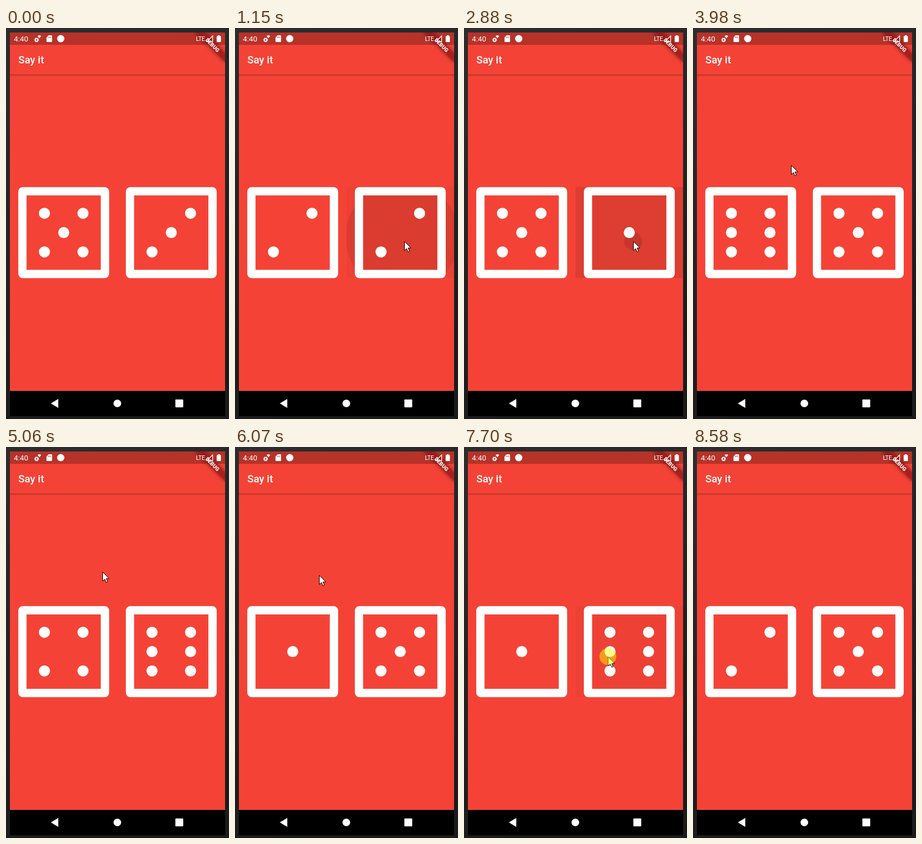
These frames come from a looping animation (398x696 px, 9.42 s). An HTML page:

```html
<!DOCTYPE html>
<html lang="en">
<head>
<meta charset="utf-8">
<title>Dice</title>
<style>
  html, body { margin: 0; width: 100%; height: 100%; overflow: hidden; background: #222; }
  svg { display: block; width: 398px; height: 696px; }
  text { font-family: Roboto, sans-serif; fill: #fff; }
</style>
</head>
<body>
<svg viewBox="0 0 398 696" xmlns="http://www.w3.org/2000/svg">
  <defs>
    <linearGradient id="desk" x2="0.3" y2="1">
      <stop offset="0" stop-color="#2d2d2f"/>
      <stop offset="0.4" stop-color="#262627"/>
      <stop offset="1" stop-color="#1b1b1b"/>
    </linearGradient>
    <linearGradient id="shade" x2="0" y2="1">
      <stop offset="0" stop-color="#000" stop-opacity=".24"/>
      <stop offset="1" stop-color="#000" stop-opacity="0"/>
    </linearGradient>
    <filter id="blur" x="-30%" y="-150%" width="160%" height="400%"><feGaussianBlur stdDeviation="3.6"/></filter>
    <clipPath id="screen"><path d="M7 8h384v683H7z"/></clipPath>
    <clipPath id="button"><rect y="283" width="192" height="162" rx="2"/></clipPath>
  </defs>

  <rect width="398" height="696" fill="url(#desk)"/>
  <g clip-path="url(#screen)">
    <path d="M7 8h384v638H7z" fill="#f44336"/>
    <path d="M7 8h384v22H7z" fill="#b73229"/>
    <path d="M7 82.6h384v4H7z" fill="url(#shade)"/>
    <text x="21.9" y="62.9" font-size="18.67" font-weight="500">Say it</text>
    <g id="dice"></g>

    <g transform="translate(391 8) rotate(45)">
      <rect x="-37.3" y="26.1" width="74.6" height="11.2" opacity=".5" filter="url(#blur)"/>
      <rect x="-37.3" y="26.1" width="74.6" height="11.2" fill="#b71c1c" fill-opacity=".63"/>
      <text y="35" font-size="9.52" font-weight="900" text-anchor="middle">DEBUG</text>
    </g>

    <text x="14" y="24" font-size="13.3">4:40</text>
    <g fill="#fff">
      <circle cx="54.6" cy="21.2" r="2.3" fill="none" stroke="#fff" stroke-width="1.7"/>
      <circle cx="54.6" cy="21.2" r="3.5" fill="none" stroke="#fff" stroke-width="1.3" stroke-dasharray="1.5 1.25"/>
      <path d="M56.4 14.4q3.2-2.6 6.4 0l-3.2 3.8z"/>
      <path d="M76 13h5.2q1 0 1 1v10q0 1-1 1h-7.9q-1 0-1-1v-7z"/>
      <path d="M75.6 15.4v2.4M77.6 15.4v2.4M79.6 15.4v2.4" stroke="#b73229" stroke-width=".9"/>
      <circle cx="97.7" cy="19" r="6.5"/>
      <text x="339" y="23" font-size="11" letter-spacing="-.5">LTE</text>
      <path d="M368.8 14v10.4h-10.4z" fill="none" stroke="#fff" stroke-width="1.3"/>
      <path d="M378 13h3.6v1.2h1q.9 0 .9.9v9q0 .9-.9.9h-5.7q-.9 0-.9-.9v-9q0-.9.9-.9h1.1z"/>
    </g>

    <path d="M7 646h384V691H7z"/>
    <g fill="#fff">
      <path d="M80 668.2l13.3-8v16z"/>
      <circle cx="198.7" cy="668.2" r="6.8"/>
      <rect x="302.3" y="661.2" width="14" height="14" rx="1"/>
    </g>
  </g>

  <g id="pointer">
    <path d="M.5 .5V16.7L4.3 13.2L7 19.1L9.5 17.9L6.9 12.2H12.1Z" fill="#fff" stroke="#000" stroke-linejoin="round"/>
    <circle id="halo" r="15" fill="#ff0" fill-opacity=".47"/>
  </g>
</svg>

<script>
const LOOP = 9420, FRAME = 77, MOVE = 400, PRESS = 150, INK = 170;

// Where the pointer rests, when it arrives and when it taps
const stops = [
  { x: 302, y: 676, at: 310, taps: [] },
  { x: 302, y: 379.5, at: 850, taps: [905, 1610, 2170, 2720] },
  { x: 100, y: 375, at: 3430, taps: [3500] },
  { x: 175, y: 244, at: 3920, taps: [4050] },
  { x: 172, y: 222, at: 4500, taps: [4590, 5130, 5600] },
  { x: 150, y: 228, at: 6000, taps: [6140] },
  { x: 100, y: 365, at: 6740, taps: [6960] },
  { x: 256.7, y: 373, at: 7610, taps: [7690, 8030] },
  { x: 371, y: 688, at: 8575, taps: [] }
];
const taps = stops.flatMap(({ x, y, taps }) => taps.map(at => ({ x, y, at })));

// One pair per roll
const faces = '53 22 46 34 51 65 32 46 24 15 43 16 43 25'.split(' ');

const svg = document.querySelector('svg');
const pointer = document.getElementById('pointer');
const halo = document.getElementById('halo');
const show = (el, on) => { el.style.display = on ? '' : 'none'; };
const mix = (a, b, u) => a + (b - a) * u;

function set(el, attrs) {
  for (const key in attrs) el.setAttribute(key, attrs[key]);
}

function add(parent, tag, attrs) {
  const el = document.createElementNS(svg.namespaceURI, tag);
  set(el, attrs);
  return parent.appendChild(el);
}

// Lowest face on which the pip at column i, row j is seen
function pipShown(i, j, n) {
  if (!i && !j) return n % 2 === 1;
  if (!j) return n === 6;
  return i !== 0 && n > (i === j ? 3 : 1);
}

function makeDie(left) {
  const die = add(document.getElementById('dice'), 'g', { transform: `translate(${left} 0)` });
  const ink = add(die, 'g', { 'clip-path': 'url(#button)' });
  const glow = add(ink, 'rect', { y: 283, width: 192, height: 162 });
  const splash = add(ink, 'circle', {});
  add(die, 'rect', {
    x: 22.2, y: 290.5, width: 147.6, height: 147.6,
    fill: 'none', stroke: '#fff', 'stroke-width': 14.7
  }).remove();
  add(die, 'path', {
    d: 'M22.9 283.2H169.1a8 8 0 0 1 8 8V437.3a8 8 0 0 1-8 8H22.9a8 8 0 0 1-8-8V291.2a8 8 0 0 1 8-8z' +
       'M29.6 298V430.6H162.2V298z',
    fill: '#fff', 'fill-rule': 'evenodd'
  });
  const pips = [];
  for (const i of [-1, 0, 1]) {
    for (const j of [-1, 0, 1]) {
      const dot = add(die, 'circle', { cx: 96 + i * 34.4, cy: 364.2 + j * 34.4, r: 9.9, fill: '#fff' });
      pips.push({ dot, i, j });
    }
  }
  return { left, ink, glow, splash, pips };
}

const dice = [makeDie(7), makeDie(199)];

function position(t) {
  const next = stops.findIndex(s => s.at > t);
  const b = stops[next < 0 ? stops.length - 1 : next];
  const a = stops[Math.max(0, next - 1)];
  const u = Math.min(1, Math.max(0, (t - b.at + MOVE) / MOVE));
  const e = u * u * (3 - 2 * u);
  return [mix(a.x, b.x, e), mix(a.y, b.y, e)];
}

// A faint glow while pressed, then a splash that grows towards the middle
function drawInk(die, tap, t) {
  const x = tap ? tap.x - die.left : -1;
  const age = tap ? t - tap.at - PRESS : INK;
  const on = x >= 0 && x < 192 && tap.y > 283 && tap.y < 445 && age < INK;
  show(die.ink, on);
  if (!on) return;
  const u = Math.min(1, Math.max(0, age / 95)) ** 2;
  set(die.glow, { 'fill-opacity': age < 0 ? 0.025 : mix(0.09, 0.03, u) });
  set(die.splash, {
    cx: mix(x, 96, u / 2), cy: mix(tap.y, 364, u / 2),
    r: age < 0 ? 0 : mix(15, 101, u), 'fill-opacity': mix(0.11, 0.08, u)
  });
}

function draw(t) {
  const [x, y] = position(Math.floor(t / FRAME) * FRAME);
  const tap = taps.filter(p => p.at <= t).pop();
  set(pointer, { transform: `translate(${x} ${y})` });
  show(pointer, t >= stops[0].at && t < stops[stops.length - 1].at);
  show(halo, tap && t < tap.at + PRESS);

  const roll = faces[taps.filter(p => p.at + PRESS <= t).length];
  dice.forEach((die, k) => {
    die.pips.forEach(({ dot, i, j }) => show(dot, pipShown(i, j, +roll[k])));
    drawInk(die, tap, t);
  });
}

const start = performance.now();
function tick() {
  draw((performance.now() - start) % LOOP);
  requestAnimationFrame(tick);
}
tick();
</script>
</body>
</html>
```
